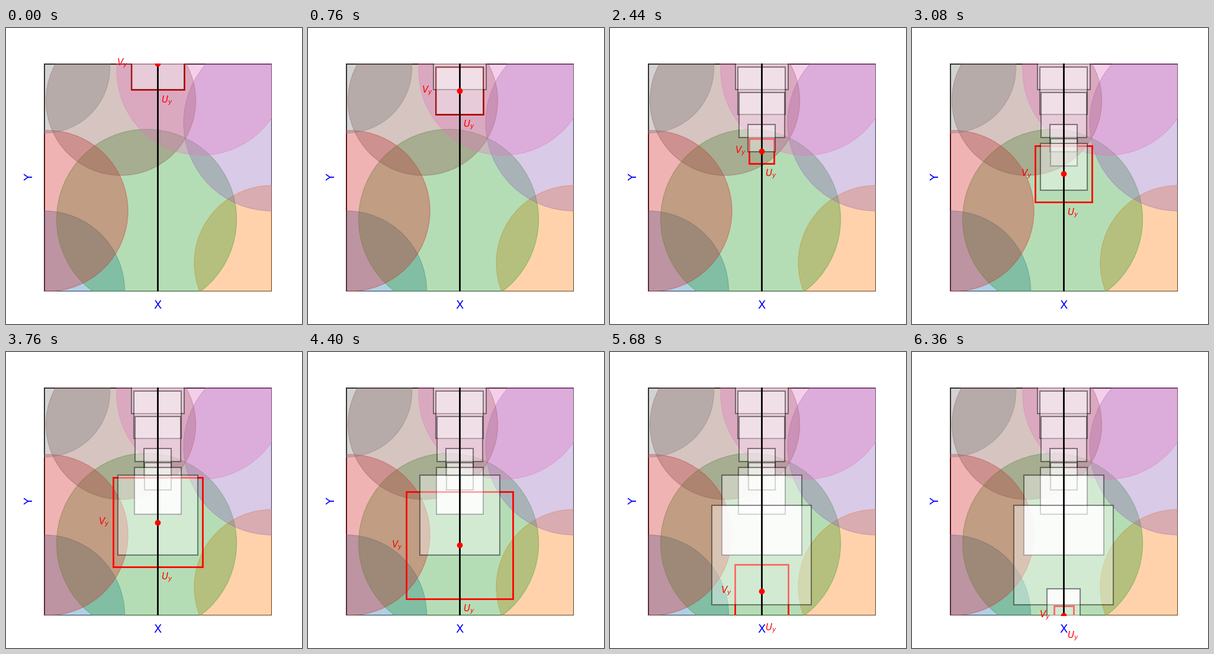
A matplotlib script for the animation above (6.4 s loop, 500 px wide and 500 px high).

```python
import numpy as np
import matplotlib.pyplot as plt
from matplotlib.animation import FuncAnimation
from matplotlib.patches import Circle, Rectangle

FRAMES, INTERVAL = 160, 40
LEFT, RIGHT, TOP, BOTTOM = 63.75, 448.75, 60, 445
SIDE = RIGHT - LEFT
MID = (LEFT + RIGHT) / 2

# Open cover of the square: centre x, centre y, radius
DISCS = [
    ("tab:blue", 65, 444.5, 135.5),
    ("tab:orange", 449, 397, 131),
    ("tab:green", 237.5, 323, 152),
    ("tab:red", 70, 309, 136),
    ("tab:purple", 449, 160, 149),
    ("tab:brown", 194, 122.5, 126.5),
    ("tab:pink", 330, 72, 143),
    ("tab:gray", 65, 67, 110.5),
]


def centre_y(i):
    return TOP + SIDE * i / (FRAMES - 1)


def half_size(y):
    """Half side of the largest square around (MID, y) safely inside a disc."""
    room = max(r - np.hypot(MID - cx, y - cy) for _, cx, cy, r in DISCS)
    return room / np.sqrt(2) - 0.01 * SIDE


def find_subcover():
    """Pick a new square whenever the centre leaves the previous one."""
    chosen, reach = [], -np.inf
    for i in range(FRAMES):
        y = centre_y(i)
        if y > reach:
            h = half_size(y)
            chosen.append((i, y, h))
            reach = y + h
    return chosen


def add_rect(x, y, w, h, **style):
    return ax.add_patch(Rectangle((x, y), w, h, **style))


fig = plt.figure(figsize=(5, 5), dpi=100, facecolor="white")
ax = fig.add_axes([LEFT / 500, 1 - BOTTOM / 500, SIDE / 500, SIDE / 500])
ax.set_xlim(LEFT, RIGHT)
ax.set_ylim(BOTTOM, TOP)
ax.set_axis_off()

fig.text(MID / 500, 1 - 474 / 500, "X", color="blue", fontsize=14,
         ha="center", va="baseline")
fig.text(45 / 500, 1 - 252.5 / 500, "Y", color="blue", fontsize=14,
         rotation=90, rotation_mode="anchor", ha="center", va="baseline")

add_rect(LEFT, TOP, SIDE, SIDE, fill=False, ec="black", lw=2, zorder=1)
for color, cx, cy, r in DISCS:
    ax.add_patch(Circle((cx, cy), r, color=color, alpha=0.35, lw=1, zorder=2))

cover = []
prev = None
for start, y, h in find_subcover():
    cover.append((start, add_rect(MID - h, y - h, 2 * h, 2 * h, lw=1.5,
                                  fc=(1, 1, 1, 0.4), ec=(0, 0, 0, 0.45),
                                  zorder=5)))
    # Overlaps of the large lower squares fade almost to white
    if prev and prev[1] > 30 and y > 270:
        w = min(h, prev[1])
        cover.append((start, add_rect(MID - w, y - h, 2 * w,
                                      sum(prev) - (y - h), fc="white",
                                      alpha=0.85, lw=0, zorder=3)))
    prev = (y, h)

moving = add_rect(MID, TOP, 1, 1, fill=False, ec="red", lw=2, zorder=4)
ax.plot([MID, MID], [TOP, BOTTOM], color="black", lw=2, zorder=6)
dot, = ax.plot([MID], [TOP], "o", color="red", ms=6, zorder=7)
label_u = ax.text(MID + 0.015 * SIDE, 0, "$U_y$", color="red", fontsize=11,
                  ha="left", va="top", zorder=8)
label_v = ax.text(0, 0, "$V_y$", color="red", fontsize=11,
                  ha="right", va="center", zorder=8)


def update(i):
    y = centre_y(i)
    h = half_size(y)
    moving.set_bounds(MID - h, y - h, 2 * h, 2 * h)
    dot.set_data([MID], [y])
    label_u.set_y(y + h + 0.02 * SIDE)
    label_v.set_position((MID - h - 0.015 * SIDE, y))
    for start, patch in cover:
        patch.set_visible(i >= start)
    return []


anim = FuncAnimation(fig, update, frames=FRAMES, interval=INTERVAL,
                     init_func=lambda: update(0), repeat=True,
                     repeat_delay=0, blit=False)
plt.show()
```
